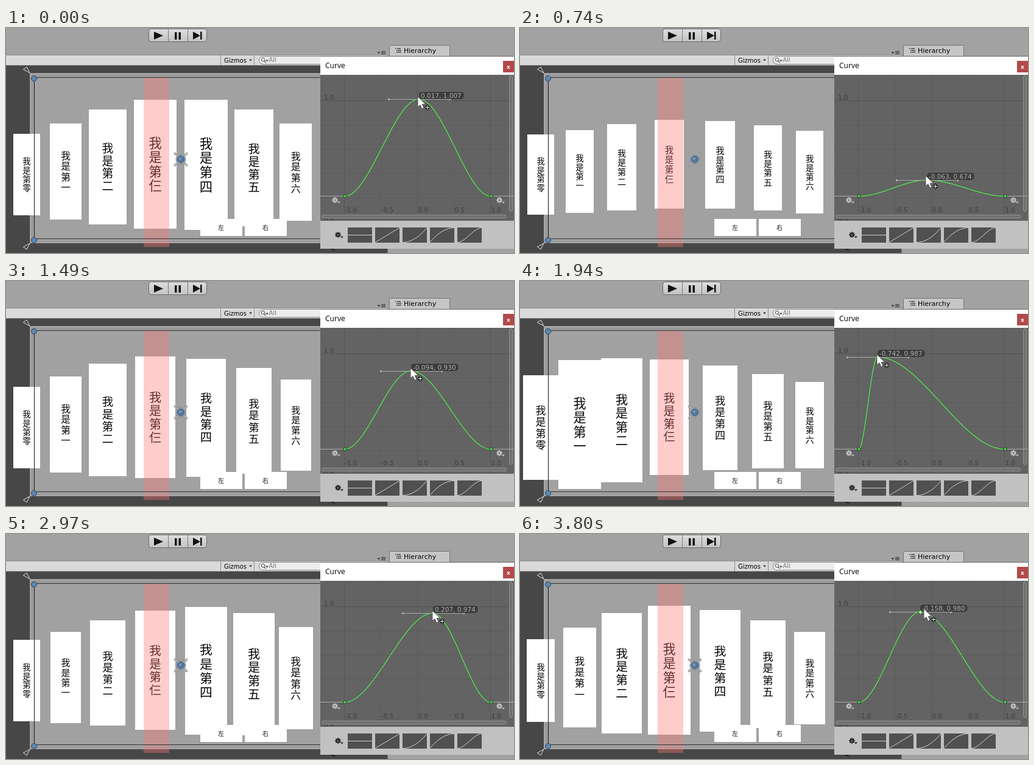
Write an HTML page with a canvas that moves like this. It is 834 px wide and 370 px high and loops after 3.87 s.

```html
<!DOCTYPE html>
<html lang="zh-CN">
<head>
<meta charset="utf-8">
<style>
  html, body { margin: 0; width: 100%; height: 100%; overflow: hidden; background: #a2a2a2; }
  canvas { display: block; }
</style>
</head>
<body>
<canvas id="stage" width="834" height="370"></canvas>
<script>
const ctx = document.getElementById('stage').getContext('2d');
const LOOP = 3870;
const UI = '"DejaVu Sans", sans-serif';
const CJK = '"Noto Sans CJK SC", "Noto Sans CJK", sans-serif';
const BASE = 0.607;

// Bursts of dragging: first update, last update, number of updates.
const bursts = [
  [100, 560, 7], [640, 910, 4], [1090, 1550, 7], [1630, 2090, 7],
  [2190, 2660, 7], [2730, 3220, 7], [3300, 3800, 7]
];
// Dragged key: time, curve x, curve value, pointer offset x and y.
const drag = [
  [0, 0.017, 1.007, -2, -4], [410, -0.05, 0.799, -3, -1], [560, -0.06, 0.71, -2, -4],
  [910, -0.067, 0.635, -1, -10], [1090, -0.067, 0.646, -1, -10], [1550, -0.1, 0.99, -1, -4],
  [1790, -0.48, 0.99, -1, -4], [1940, -0.742, 0.987, -1, -4], [2090, -0.42, 0.99, -1, -4],
  [2500, 0.4, 0.942, 0, -5], [2680, 0.54, 0.965, 0, -4], [3300, -0.442, 0.992, -4, -4],
  [3510, -0.81, 0.985, 0, -4], [3800, -0.158, 0.98, 6, -5]
];
// Cards: last character, centre x, centre y.
const cards = [
  ['零', 34, 241], ['一', 98, 236], ['二', 167, 228.7], ['仨', 245, 224],
  ['四', 328.5, 225], ['五', 407, 230.3], ['六', 475.7, 237]
];

const graphX = x => 676 + 120 * x;
const graphY = v => 200 - (v - 0.799) * 399;
const smooth = t => t * t * (3 - 2 * t);

function lastUpdate(time) {
  let result = 0;
  for (const [from, to, count] of bursts) {
    const step = (to - from) / (count - 1);
    for (let i = 0; i < count; i++) {
      const at = Math.round((from + i * step) / 10) * 10;
      if (at <= time) result = at;
    }
  }
  return result;
}

function dragAt(time) {
  let i = 0;
  while (i < drag.length - 2 && drag[i + 1][0] <= time) i++;
  const a = drag[i], b = drag[i + 1];
  const p = Math.min(1, (time - a[0]) / (b[0] - a[0]));
  const [, x, value, dx, dy] = a.map((n, k) => n + (b[k] - n) * p);
  return { x, value, dx, dy };
}

function evaluate(x, key) {
  const t = x < key.x ? (x + 1) / (key.x + 1) : (1 - x) / (1 - key.x);
  return BASE + (key.value - BASE) * smooth(t);
}

function rect(x, y, w, h, color) {
  ctx.fillStyle = color;
  ctx.fillRect(x, y, w, h);
}

function line(points, color, width = 1) {
  ctx.beginPath();
  points.forEach(([x, y]) => ctx.lineTo(x, y));
  ctx.strokeStyle = color;
  ctx.lineWidth = width;
  ctx.stroke();
}

function shape(points, fill, stroke) {
  ctx.beginPath();
  points.forEach(([x, y]) => ctx.lineTo(x, y));
  ctx.closePath();
  paint(fill, stroke);
}

function paint(fill, stroke) {
  if (fill) { ctx.fillStyle = fill; ctx.fill(); }
  if (stroke) { ctx.strokeStyle = stroke; ctx.lineWidth = 1; ctx.stroke(); }
}

function round(x, y, w, h, r, fill, stroke) {
  ctx.beginPath();
  ctx.roundRect(x, y, w, h, r);
  paint(fill, stroke);
}

function circle(x, y, r, fill, stroke) {
  ctx.beginPath();
  ctx.arc(x, y, r, 0, 7);
  paint(fill, stroke);
}

function text(string, x, y, font, color, align = 'left') {
  ctx.font = font;
  ctx.fillStyle = color;
  ctx.textAlign = align;
  ctx.textBaseline = 'alphabetic';
  ctx.fillText(string, x, y);
}

function diamond(x, y, r, fill, stroke) {
  shape([[x - r, y], [x, y - r], [x + r, y], [x, y + r]], fill, stroke);
}

function dropArrow(x, y, color) {
  shape([[x - 2.5, y - 1.5], [x + 2.5, y - 1.5], [x, y + 1.5]], color);
}

function gear(x, y, color) {
  for (let i = 0; i < 4; i++) {
    const c = Math.cos(i * Math.PI / 4) * 5, s = Math.sin(i * Math.PI / 4) * 5;
    line([[x - c, y - s], [x + c, y + s]], color, 1.6);
  }
  circle(x, y, 3.6, color);
  circle(x, y, 1.5, '#777');
  dropArrow(x + 6.5, y + 4, color);
}

function drawToolbar() {
  rect(0, 0, 834, 370, '#a2a2a2');
  const shine = ctx.createLinearGradient(0, 1, 0, 23);
  shine.addColorStop(0, '#dedede');
  shine.addColorStop(1, '#c2c2c2');
  round(234.5, 1.5, 95, 21, 4, shine, '#6a6a6a');
  line([[266.5, 2], [266.5, 22]], '#777');
  line([[298.5, 2], [298.5, 22]], '#777');
  shape([[243, 6], [258, 12.5], [243, 19]], '#111');
  rect(277, 7, 3.5, 12, '#111');
  rect(283.5, 7, 3.5, 12, '#111');
  shape([[307, 6], [319, 12.5], [307, 19]], '#111');
  rect(319, 6, 2.5, 13, '#111');

  round(629.5, 28.5, 99, 22, 2, '#c6c6c6', '#747474');
  for (let i = 0; i < 3; i++) {
    rect(639 + (i ? 2 : 0), 33 + i * 3, 1.5, 1.5, '#333');
    rect(642 + (i ? 1 : 0), 33 + i * 3, 6, 1.3, '#333');
    rect(616, 38 + i * 2, 7, 1, '#333');
  }
  dropArrow(612, 41, '#333');
  text('Hierarchy', 653, 41, '11px ' + UI, '#000');

  rect(0, 44, 626, 1, '#8a8a8a');
  rect(0, 45, 626, 16, '#d9d9d9');
  rect(0, 61, 626, 1, '#777');
  rect(352, 45, 1, 16, '#8c8c8c');
  rect(407, 45, 1, 16, '#8c8c8c');
  text('Gizmos', 358, 57, '10px ' + UI, '#000');
  dropArrow(401.5, 53, '#333');
  round(415.5, 46.5, 160, 13, 6.5, '#ececec', '#858585');
  circle(422, 52, 2.8, null, '#555');
  line([[424, 54], [426.5, 57]], '#555', 1.3);
  dropArrow(428.5, 54, '#555');
  text('All', 431.5, 56, '10px ' + UI, '#777');
}

function drawCard([last, x, y], scale) {
  const left = Math.round(x - 36 * scale), right = Math.round(x + 36 * scale);
  const top = Math.round(y - 108 * scale), bottom = Math.round(y + 108 * scale);
  rect(left, top, right - left, bottom - top, '#fff');
  ctx.font = 21.5 * scale + 'px ' + CJK;
  ctx.fillStyle = '#050505';
  ctx.textAlign = 'center';
  [...('我是第' + last)].forEach((char, i) =>
    ctx.fillText(char, x, y + ((i - 1.5) * 23.8 + 8.3) * scale));
}

function drawButton(label, x) {
  rect(x, 314, 69, 28, '#fff');
  text(label, x + 34, 331.5, '10px ' + CJK, '#111', 'center');
}

function cameraMark(y, flip) {
  shape([[28.5, y - 2 * flip], [34, y - 6 * flip], [39, y + 4 * flip]], '#444', '#e6e6e6');
}

function drawScene(key) {
  rect(0, 62, 626, 308, '#474747');
  rect(626, 62, 1, 308, '#777');
  rect(39, 74, 501, 280, '#999');
  ctx.lineWidth = 1;
  ctx.strokeStyle = '#b0b0b0';
  ctx.strokeRect(40.5, 75.5, 498, 277);
  rect(45, 81, 490, 267, '#a1a1a1');
  cameraMark(70, 1);
  cameraMark(358, -1);
  shape([[532, 363], [538, 363], [541, 367]], '#222');

  cards.forEach((card, i) => drawCard(card, evaluate(-0.873 + 0.249 * i, key)));
  drawButton('左', 319);
  drawButton('右', 392);
  rect(226, 81, 42, 279, 'rgba(255,117,117,.37)');

  rect(46, 81, 480, 1, '#333');
  rect(46, 346, 480, 1, '#333');
  rect(46, 82, 1, 268, '#111');
  rect(46, 349, 480, 1, '#a8a8a8');
  circle(46, 83, 4.5, '#5d87b0', '#28445f');
  circle(46, 349, 4.5, '#5d87b0', '#28445f');

  for (let i = 0; i < 4; i++) {
    const angle = (i + 0.5) * Math.PI / 2, c = Math.cos(angle), s = Math.sin(angle);
    line([[287 + 8 * c, 216 + 8 * s], [287 + 15 * c, 216 + 15 * s]], '#777', 3);
    line([[287 + 8 * c, 216 + 8 * s], [287 + 14.5 * c, 216 + 14.5 * s]], '#d4d4d4', 1.4);
  }
  circle(287, 216, 8, '#b4b8bc', '#888');
  circle(287, 216, 6, '#55789c', '#3e5d7c');
  circle(286, 215, 2, '#7f9dbb');
}

function drawPresets() {
  rect(516, 317, 318, 46, '#c1c1c1');
  gear(545, 340, '#222');
  const eases = [() => 0.5, t => t, t => t * t, t => t * (2 - t), smooth];
  eases.forEach((ease, n) => {
    const x = 561 + 45 * n;
    rect(x, 328, 40, 25, '#505050');
    const points = Array.from({ length: 21 }, (_, i) => [x + 2 * i, 352.5 - 24 * ease(i / 20)]);
    line(points, '#d0d0d0');
  });
}

function drawPointer(x, y) {
  shape([[x, y], [x, y + 17], [x + 4, y + 13.5], [x + 7, y + 20], [x + 10, y + 18.5],
    [x + 7.2, y + 12.5], [x + 12.5, y + 12]], '#fff', '#555');
  const cx = x + 16, cy = y + 17.5;
  line([[cx - 4, cy], [cx + 4, cy]], '#111', 3);
  line([[cx, cy - 4], [cx, cy + 4]], '#111', 3);
  diamond(cx, cy, 4.5, null, '#111');
  line([[cx - 3.5, cy], [cx + 3.5, cy]], '#fff');
  line([[cx, cy - 3.5], [cx, cy + 3.5]], '#fff');
}

function drawGraph(key) {
  ctx.save();
  ctx.beginPath();
  ctx.rect(516, 77, 318, 240);
  ctx.clip();
  rect(516, 77, 318, 240, '#636363');
  for (let i = 0; i < 5; i++) {
    rect(555 + 60 * i, 77, 1, 240, i % 2 ? '#5d5d5d' : '#575757');
    rect(516, 119 + 40 * i, 318, 1, i ? '#5c5c5c' : '#535353');
  }
  const labelFont = '10.5px ' + UI;
  text('1.0', 522, 118, labelFont, '#3e3e3e');
  text('0.5', 522, 319, labelFont, '#3e3e3e');
  for (let i = -3; i <= 2; i++) {
    text((i / 2).toFixed(1), graphX(i / 2) + (i < 0 ? 0 : 0.5), 303, labelFont, '#3e3e3e');
  }
  round(518.5, 307.5, 303, 5, 2.5, '#707070', '#929292');
  round(826.5, 78.5, 5, 223, 2.5, '#707070', '#929292');

  line([[516, 276.5], [556, 276.5]], '#aaa');
  line([[796, 276.5], [834, 276.5]], '#aaa');
  gear(540, 283, '#c4c4c4');
  gear(810, 283, '#c4c4c4');

  const points = [];
  for (let px = 0; px <= 240; px++) {
    const x = px / 120 - 1;
    points.push([graphX(x), graphY(evaluate(x, key))]);
  }
  line(points, '#48f848', 1.15);
  diamond(556.5, 276.5, 3, '#42d942', '#123c12');
  diamond(796.5, 276.5, 3, '#42d942', '#123c12');

  const x = Math.round(graphX(key.x)), y = Math.round(graphY(key.value));
  line([[x - 50, y + 0.5], [x + 50, y + 0.5]], '#aaa');
  diamond(x - 49.5, y + 0.5, 1.8, '#ccc', '#888');
  diamond(x + 50.5, y + 0.5, 1.8, '#ccc', '#888');
  diamond(x + 0.5, y + 0.5, 3, '#a4f5a4', '#40cc40');

  const label = key.x.toFixed(3) + ', ' + key.value.toFixed(3);
  ctx.font = labelFont;
  round(x, y - 12, ctx.measureText(label).width + 7, 12, 5, 'rgba(54,54,54,.85)');
  text(label, x + 3, y - 2, labelFont, '#b0b0b0');
  drawPointer(Math.round(x + key.dx), Math.round(y + key.dy));
  ctx.restore();
}

function drawCurveWindow(key) {
  rect(516, 46, 318, 1, '#666');
  rect(516, 47, 318, 30, '#fff');
  text('Curve', 524, 66, '12px "Noto Sans", sans-serif', '#111');
  rect(816, 54, 18, 19, '#b34a4a');
  text('x', 825, 67, 'bold 9px ' + UI, '#fff', 'center');
  drawPresets();
  drawGraph(key);
}

function render(now) {
  const key = dragAt(lastUpdate(now % LOOP));
  drawToolbar();
  drawScene(key);
  drawCurveWindow(key);
}

const start = performance.now();
function tick() {
  render(performance.now() - start);
  requestAnimationFrame(tick);
}
tick();
</script>
</body>
</html>
```
